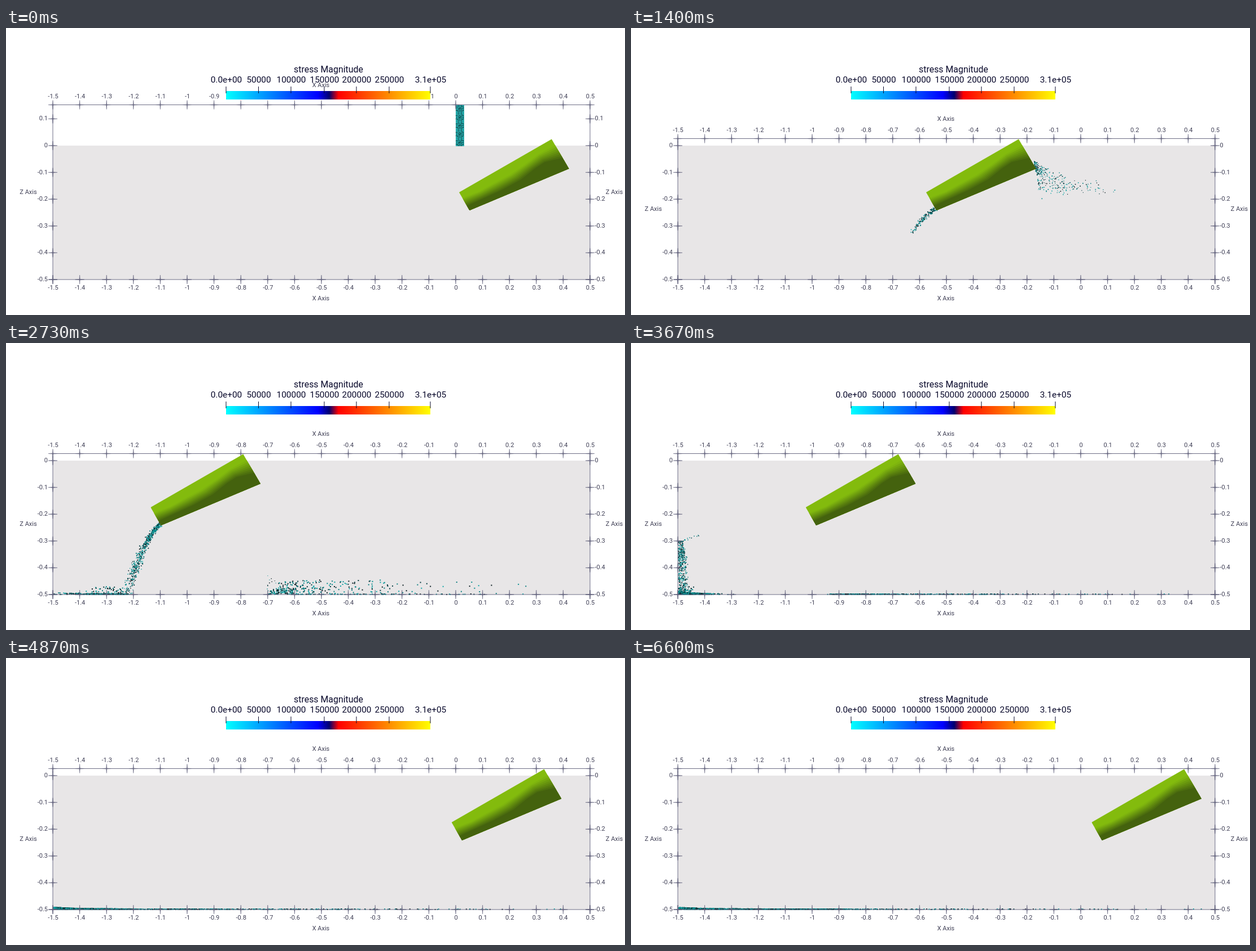
Animation, 1097 px wide and 510 px high, one loop 6.67 s. Source, as an HTML page with a canvas:

```html
<!DOCTYPE html>
<html lang="en">
<head>
<meta charset="utf-8">
<title>Stress magnitude</title>
<style>
  html, body { margin: 0; width: 100%; height: 100%; overflow: hidden; background: #fff; }
  canvas, svg { position: absolute; left: 0; top: 0; width: 1097px; height: 510px; }
  text { font: 11px Roboto, sans-serif; fill: #3f3f55; text-anchor: middle; dominant-baseline: central; }
  .left { text-anchor: end; }
  .right { text-anchor: start; }
  #legend text { font-size: 15.4px; fill: #0a0a2c; }
  #legend .title { font-size: 15.9px; }
  .line { fill: none; stroke: #6d6d86; stroke-width: 1; }
  .star { fill: #62627c; stroke: #62627c; stroke-width: .5; }
</style>
</head>
<body>
<canvas id="stage" width="1097" height="510"></canvas>
<svg viewBox="0 0 1097 510">
  <defs>
    <linearGradient id="scale">
      <stop offset="0" stop-color="#0ff"/>
      <stop offset=".45" stop-color="#00f"/>
      <stop offset=".505" stop-color="#000070"/>
      <stop offset=".55" stop-color="#f00"/>
      <stop offset="1" stop-color="#ff0"/>
    </linearGradient>
    <clipPath id="body"><path d="M0 292L164 197.5L194.5 250L18.5 324Z"/></clipPath>
  </defs>
  <g id="axes">
    <path id="sides" class="line"/>
    <path class="line" d="M83 447H1035"/>
    <g id="top"><path class="line" d="M83 0H1035"/></g>
  </g>
  <g id="tube" clip-path="url(#body)"><path d="M0 190H200V330H0Z" fill="#83bb0d"/></g>
  <g id="legend">
    <rect x="390" y="112" width="362" height="15" fill="url(#scale)"/>
    <text class="title" x="571.5" y="73">stress Magnitude</text>
  </g>
</svg>
<script>
const LOOP = 6670, FPS = 15, HALF_G = 120;
const LEFT = 83, RIGHT = 1035, ZERO = 209, FLOOR = 447, STEP = 47.6;
const $ = id => document.getElementById(id);
const ctx = $('stage').getContext('2d');

function add(parent, tag, attrs, content = '') {
  const node = document.createElementNS('http://www.w3.org/2000/svg', tag);
  for (const name in attrs) node.setAttribute(name, attrs[name]);
  node.textContent = content;
  return parent.appendChild(node);
}
const label = (parent, x, y, content, cls = '') => add(parent, 'text', { x, y, class: cls }, content);
const star = (parent, x, y) => add(parent, 'path', {
  class: 'star',
  d: `M${x - 8} ${y}l7.4-.6l.6-7.4l.6 7.4l7.4 .6l-7.4 .6l-.6 7.4l-.6-7.4Z`
});

// Axes
const axes = $('axes'), topAxis = $('top');
for (let i = 0; i <= 20; i++) {
  const x = LEFT + STEP * i, value = String((i - 15) / 10);
  star(axes, x, FLOOR);
  star(topAxis, x, 0);
  label(axes, x + .5, 461, value);
  label(topAxis, x + .5, -15.5, value);
}
label(axes, 558, 480, 'X Axis');
label(topAxis, 558, -35, 'X Axis');
const zTitles = [39.5, 1078].map(x => label(axes, x, 0, 'Z Axis'));
const upperTick = add(axes, 'g', {});
for (let i = -1; i <= 5; i++) {
  const parent = i < 0 ? upperTick : axes, y = ZERO + STEP * i, value = String(-i / 10 || 0);
  star(parent, LEFT, y);
  star(parent, RIGHT, y);
  label(parent, 74, y - .5, value, 'left');
  label(parent, 1043.5, y - .5, value, 'right');
}

// Legend
[[390, '0.0e+00'], [447.5, '50000'], [505, '100000'], [564, '150000'],
 [621, '200000'], [679, '250000'], [752, '3.1e+05']].forEach(([x, value]) => {
  label($('legend'), x + .5, 92, value);
  add($('legend'), 'path', { d: `M${x} 104V116`, stroke: '#0a0a2c' });
});

// Shaded bands of the tube, blended between two contour lines
const upper = [[6, 302], [35, 291], [60, 277], [90, 261], [115, 244], [140, 225], [172, 207]];
const lower = [[14, 316], [40, 304], [75, 288], [110, 269], [135, 249], [152, 238], [190, 229]];
const mix = (a, b, k) => a + (b - a) * k;
for (let n = 0; n < 8; n++) {
  const k = n / 7;
  const points = upper.map(([x, y], i) => [mix(x, lower[i][0], k), mix(y, lower[i][1], k)]);
  const tint = [[126, 68], [180, 98], [14, 14]].map(([a, b]) => Math.round(mix(a, b, k)));
  add($('tube'), 'path', { d: `M-20 ${points[0][1] + 10}L${points.join('L')}L220 ${points[6][1] - 14}V340H-20Z`, fill: `rgb(${tint})` });
}

// Seeded random numbers
let seed = 20;
function rand(a = 0, b = 1) {
  seed = (seed + 0x6D2B79F5) | 0;
  let r = Math.imul(seed ^ seed >>> 15, 1 | seed);
  r = r + Math.imul(r ^ r >>> 7, 61 | r) ^ r;
  return a + (b - a) * ((r ^ r >>> 14) >>> 0) / 4294967296;
}

const tubeX = t => t < 49 / FPS ? 803 - 200 * t
  : Math.min(803 - 200 * 49 / FPS + 400 * (t - 49 / FPS), 816.3);

const INKS = ['#12a5a5', '#0b8f90', '#0f7f80', '#063c40', '#0a1c20'];
const drops = [];
function drop(start, x, y, vx, vy, more) {
  const land = (-vy + Math.sqrt(vy * vy + 4 * HALF_G * (FLOOR - y))) / (2 * HALF_G);
  drops.push({ start, x, y, vx, vy, land, ink: INKS[Math.floor(rand(0, 5))], lift: rand(), ...more });
}

// Spill out of the wide end
for (let i = 0; i < 390; i++) {
  const s = .81 + .75 * rand() ** 1.4;
  const vx = -188 + 284 * Math.exp(-4 * (s - .8)) * rand() ** 1.2;
  drop(s, tubeX(s) + 191, rand(236, 250), vx, rand(0, 22),
    { slide: vx < 0 ? .7 : .9, drag: .3, hop: rand(35, 112), rebound: .3, size: rand(1, 1.7) });
}
// Stream from the narrow end
for (let i = 0; i < 1450; i++) {
  const s = 1 + 2.26 * rand() ** .72;
  const late = Math.min(1, Math.max(0, (s - 1.6) / .4));
  const u = mix(108, 74, late) + (rand() + rand() - 1) * mix(9, 16, late);
  drop(s, tubeX(s) + 18 + rand(-4, 2), rand(318, 325), -200 - u, s > 3 ? rand(28, 62) : rand(52, 64),
    { slide: rand(.65, 1.02), drag: .001, hop: 90 * rand() ** 4, rebound: .35 * rand(), size: rand(1.2, 2) });
}
// Last drops thrown off as the tube turns back
for (let i = 0; i < 26; i++) {
  const k = rand() ** .6;
  drop(3.27, 170, 321, mix(-105, -220, k), mix(-3, 36, k) + rand(-4, 4),
    { slide: .6, drag: .3, hop: 10, rebound: .1, size: 1.5 });
}

function drawDrop(d, t) {
  const age = t - d.start;
  if (age < 0) return;
  const air = Math.min(age, d.land), ground = age - air;
  let x = d.x + d.vx * (air + d.slide * (1 - Math.exp(-d.drag * ground)) / d.drag);
  let y = d.y + d.vy * air + HALF_G * air * air;
  if (x < LEFT) x = LEFT + (LEFT - x) * d.rebound;
  if (x > RIGHT - 1) x = RIGHT - 1 - (x - RIGHT + 1) * .4;
  if (ground > 0) {
    const pile = 1 + 3 * Math.exp((LEFT - x) / 45);
    y = FLOOR - Math.max(d.lift * pile, d.hop * ground - HALF_G * ground * ground);
  }
  const size = ground > 0 ? 2 : d.size;
  ctx.fillStyle = d.ink;
  ctx.fillRect(x, Math.min(y, FLOOR) - size / 2, size, size);
}

// Packed column of grains that drops into the tube
function drawColumn(fall) {
  for (let j = 0; j < 74; j++) {
    const y = 136 + j + fall;
    if (y > 240) break;
    for (let i = 0; i < 15; i++) {
      const r = Math.hypot(i - 7, j % 15 - 7);
      const dark = Math.cos(r * r * .55) > .1 && (i + j) % 3;
      ctx.fillStyle = dark ? '#0a2529' : (i + j) % 2 ? '#35b5b5' : '#159a9c';
      ctx.fillRect(797 + i, y, 1, 1);
    }
  }
}

function draw() {
  const frame = Math.min(99, Math.floor((performance.now() % LOOP + 3.4) * FPS / 1000));
  const t = frame / FPS, fall = HALF_G * t * t, top = Math.min(136.5 + fall, 196.5);

  ctx.clearRect(0, 0, 1097, 510);
  ctx.fillStyle = '#e8e6e7';
  ctx.fillRect(LEFT, ZERO, RIGHT - LEFT, FLOOR - ZERO);
  if (t < .8) drawColumn(fall);
  drops.forEach(d => drawDrop(d, t));

  $('tube').setAttribute('transform', `translate(${tubeX(t)} 0)`);
  topAxis.setAttribute('transform', `translate(0 ${top})`);
  $('sides').setAttribute('d', `M${LEFT} ${top}V${FLOOR}M${RIGHT} ${top}V${FLOOR}`);
  upperTick.setAttribute('visibility', top <= ZERO - STEP ? 'visible' : 'hidden');
  zTitles.forEach(title => title.setAttribute('y', (top + FLOOR) / 2 - .5));
  requestAnimationFrame(draw);
}
draw();
</script>
</body>
</html>
```
